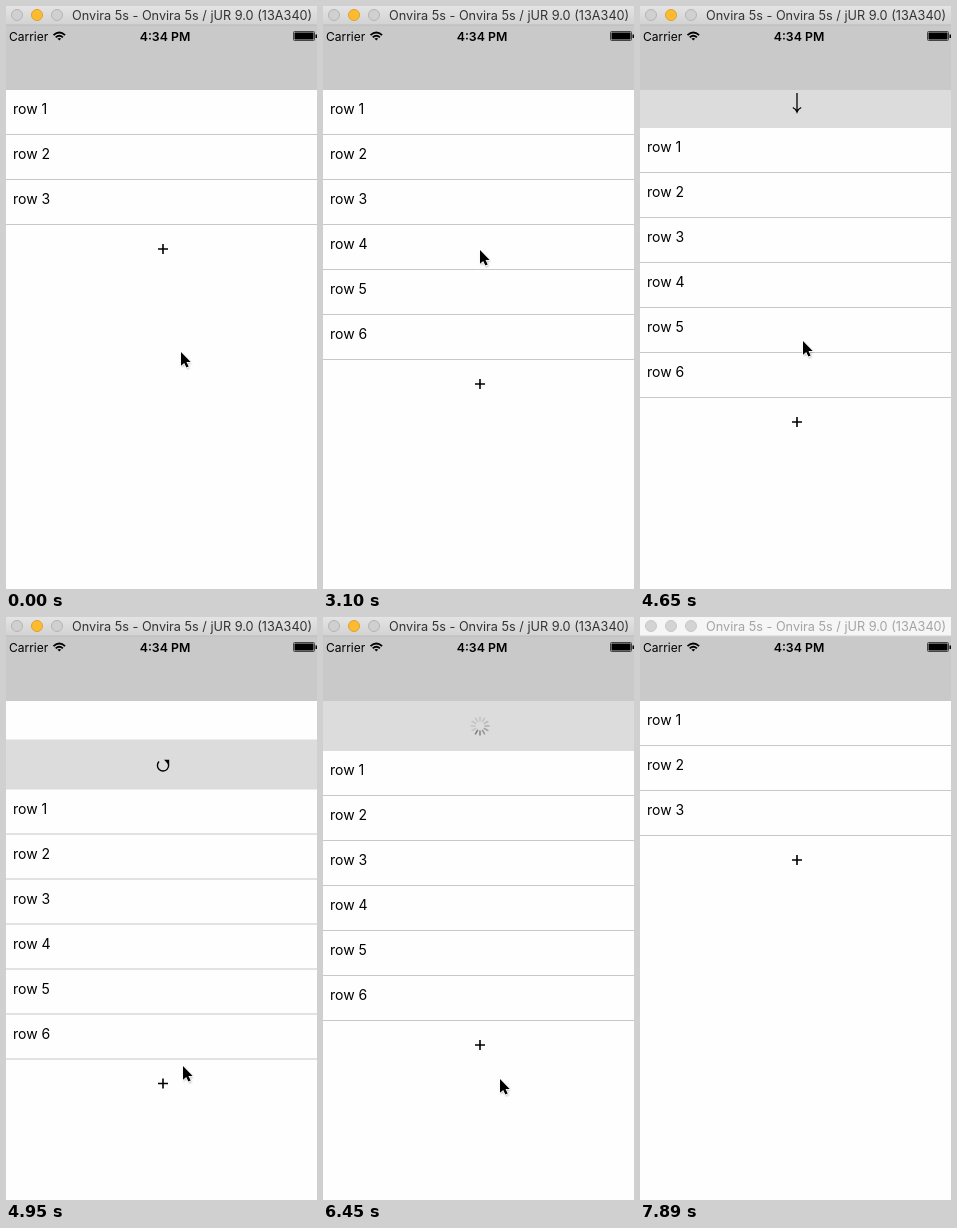
An HTML page that plays this animation: 311 by 583 pixels, repeating every 7.99 s.

```html
<!DOCTYPE html>
<html lang="en">
<head>
<meta charset="utf-8">
<title>Pull to refresh list</title>
<style>
  html, body { margin: 0; width: 100%; height: 100%; overflow: hidden; background: #fefefe; }
  svg { display: block; width: 311px; height: 583px; }
  text { font-family: Inter, Roboto, sans-serif; fill: #000; white-space: pre; }
  .icon { fill: none; stroke: #000; }
</style>
</head>
<body>
<svg viewBox="0 0 311 583">
  <defs>
    <linearGradient id="chrome" x2="0" y2="1">
      <stop stop-color="#e4e4e4"/><stop offset="1" stop-color="#d2d2d2"/>
    </linearGradient>
    <filter id="soft" x="-50%" y="-50%" width="200%" height="200%">
      <feGaussianBlur stdDeviation="0.8"/>
    </filter>
  </defs>
  <rect width="311" height="583" fill="#fefefe"/>

  <g id="list">
    <g id="header">
      <rect y="34" width="311" height="50" fill="#dcdcdc"/>
      <path id="pull" class="icon" stroke-width="1.3" d="M157 49V67.5M152.8 63.5Q156 65 157 68Q158 65 161.2 63.5"/>
      <g id="release">
        <path class="icon" stroke-width="1.4" d="M160.6 55.6A5.6 5.6 0 1 1 153 56"/>
        <path d="M158 54.2H163.2V59.4Z"/>
      </g>
    </g>
    <g id="rows"></g>
    <path id="plus" class="icon" stroke-width="1.6" d="M152 0H162M157 -5V5"/>
    <g id="spinner" stroke="#000" stroke-width="1.6" stroke-linecap="round"></g>
  </g>

  <rect y="19" width="311" height="65" fill="#c9c9c9"/>
  <text x="3" y="34.5" font-size="12">Carrier</text>
  <g class="icon" stroke-width="1.8">
    <path d="M47.5 29.2Q53.3 23.8 59.1 29.2M49.7 31.4Q53.3 28.2 56.9 31.4"/>
    <path d="M51.4 32.6Q53.3 31.2 55.2 32.6L53.3 34.6Z" fill="#000" stroke="none"/>
  </g>
  <text x="159" y="34.5" font-size="12.3" font-weight="600" text-anchor="middle">4:34 PM</text>
  <rect x="287.5" y="25.5" width="21" height="9" rx="1" fill="none" stroke="#444"/>
  <rect x="288.5" y="26.5" width="19" height="7"/>
  <rect x="309.5" y="28.5" width="1.5" height="3.5"/>

  <rect id="bar" width="311" height="19"/>
  <rect id="edge" y="18.5" width="311" height="1"/>
  <g id="dots"></g>
  <text id="title" x="66" y="14" font-size="12.7">Onvira 5s - Onvira 5s / jUR 9.0 (13A340)</text>

  <g id="cursor">
    <path d="M0 0V14.2L3.3 11.2L5.6 16L8 15L5.8 10.2H10Z" transform="translate(.5 1)" fill="#000" opacity=".4" filter="url(#soft)"/>
    <path d="M0 0V13.8L3.2 10.9L5.4 15.6L7.7 14.6L5.5 10H9.7Z" stroke="#fff" stroke-width="1.6" paint-order="stroke"/>
  </g>
</svg>
<script>
const LOOP = 7990, TOP = 84, ROW = 45;
const LOADED = 3100, REFRESH = 5550, DONE = 6570, CURSOR_OUT = 7050, BLUR = 7890;
const $ = id => document.getElementById(id);

function add(parent, tag, attrs, text = '') {
  const el = document.createElementNS('http://www.w3.org/2000/svg', tag);
  set(el, attrs);
  el.textContent = text;
  return $(parent).appendChild(el);
}
function set(el, attrs) {
  for (const name in attrs) el.setAttribute(name, attrs[name]);
}
const show = (el, on) => set(el, { visibility: on ? 'visible' : 'hidden' });

const rows = Array.from({ length: 6 }, (_, i) => {
  const row = add('rows', 'g', { transform: `translate(0 ${TOP + i * ROW})` });
  row.id = 'row' + i;
  add(row.id, 'text', { x: 7, y: 24, 'font-size': 14 }, 'row ' + (i + 1));
  add(row.id, 'rect', { y: 44, width: 311, height: 1, fill: '#c8c8c8' });
  return row;
});
const spokes = Array.from({ length: 12 }, (_, i) =>
  add('spinner', 'path', { d: 'M0 -5V-9', transform: `rotate(${i * 30})` }));
const dots = [11, 31, 51].map(cx => add('dots', 'circle', { cx, cy: 9, r: 5.5 }));

// Keys are [time, value, value...], joined by straight segments.
const cursorKeys = [
  [0, 175, 346], [60, 176, 343], [200, 179.5, 325], [350, 173, 288], [500, 162, 257], [660, 157, 244],
  [4360, 157, 244], [4420, 157.5, 252], [4650, 163, 335], [4800, 171, 400], [4950, 177, 449],
  [5070, 177.5, 460], [5190, 177, 462]
];
const offsetKeys = [
  [4360, 0], [4420, 2], [4540, 18], [4650, 38], [4800, 66], [4950, 88.5], [5070, 92], [5190, 93],
  [5490, 93], [5550, 88], [5610, 79], [5670, 68.5], [5730, 60], [5790, 54], [5850, 51], [5910, 50],
  [6510, 50], [6570, 47], [6630, 39], [6690, 26], [6750, 14], [6810, 6], [6870, 1.5], [6930, 0]
];
function sample(keys, t) {
  const next = keys.findIndex(k => k[0] > t);
  if (next === 0) return keys[0].slice(1);
  if (next < 0) return keys[keys.length - 1].slice(1);
  const a = keys[next - 1], b = keys[next], p = (t - a[0]) / (b[0] - a[0]);
  return a.slice(1).map((v, i) => v + (b[i + 1] - v) * p);
}

// The picture advances in 60 ms steps whose phase shifts between actions.
function snap(t) {
  const phase = t < 2030 ? 0 : t < LOADED ? 50 : t < 4590 ? 40 : 30;
  return t - (t - phase + 60) % 60;
}

function draw(time) {
  const t = snap(time);
  const [offset] = sample(offsetKeys, t);
  const [x, y] = sample(cursorKeys, t);
  const count = t >= LOADED && t < DONE ? 6 : 3;
  const end = TOP + count * ROW;
  const loading = t >= 2030 && t < LOADED;
  const refreshing = t >= REFRESH && t < DONE;

  set($('list'), { transform: `translate(0 ${offset})` });
  rows.forEach((row, i) => show(row, i < count));
  show($('header'), offset > 0);
  set($('pull'), { opacity: +(!refreshing && (offset < 55 || t >= DONE)) });
  set($('release'), { opacity: +(!refreshing && offset >= 55 && t < DONE) });

  set($('plus'), { transform: `translate(0 ${end + 24})` });
  show($('plus'), !loading);
  show($('spinner'), loading || refreshing);
  set($('spinner'), { transform: `translate(157 ${loading ? end + 21.5 : 59})` });
  const head = Math.floor(loading ? (t - 2030) * 12 / 1000 : (t - REFRESH) * 12 / 1000 + 8.3);
  spokes.forEach((spoke, i) => {
    const age = ((head - i) % 12 + 12) % 12;
    set(spoke, { opacity: Math.max(0.1, 0.42 - age * 0.055) });
  });

  set($('cursor'), { transform: `translate(${x} ${y})` });
  show($('cursor'), t < CURSOR_OUT);

  const active = t < BLUR;
  set($('bar'), { fill: active ? 'url(#chrome)' : '#f6f6f6' });
  set($('edge'), { fill: active ? '#bcbcbc' : '#d4d4d4' });
  $('title').style.fill = active ? '#333' : '#a4a4a4';
  dots.forEach((dot, i) => set(dot, active
    ? { fill: i === 1 ? '#fdbc2f' : '#d0d0d0', stroke: i === 1 ? '#dea032' : '#b4b4b4' }
    : { fill: '#d4d4d4', stroke: '#c8c8c8' }));
}

const start = performance.now();
function frame() {
  draw((performance.now() - start) % LOOP);
  requestAnimationFrame(frame);
}
frame();
</script>
</body>
</html>
```
